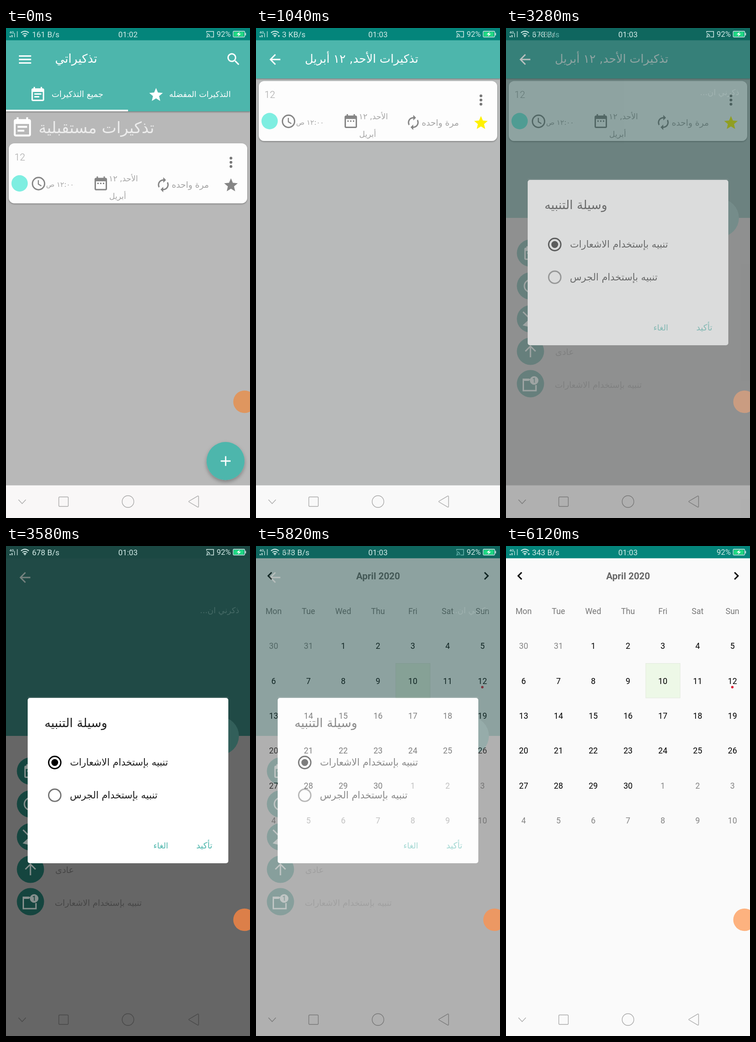
These frames come from a looping animation (529 by 1058 pixels, 8000 ms). An HTML page:

```html
<!DOCTYPE html>
<html lang="ar">
<head>
<meta charset="utf-8">
<title>تذكيراتي</title>
<style>
html, body { margin: 0; width: 100%; height: 100%; overflow: hidden; background: #b8b8b8; }
svg { display: block; width: 100vw; height: 100vh; }
text { font-family: Roboto, "Noto Sans", sans-serif; text-anchor: middle; }
.ar { font-family: "DejaVu Sans", sans-serif; direction: rtl; }
</style>
</head>
<body>
<svg id="stage" viewBox="0 0 529 1058" xmlns="http://www.w3.org/2000/svg"></svg>
<script>
const LOOP = 8000, STEP = 60, STEPS = 10;
const TEAL = '#4db6ac', GREY = '#858585';

// 24-unit icon outlines
const ICONS = {
  search: 'M15.5 14h-.79l-.28-.27C15.41 12.59 16 11.11 16 9.5 16 5.91 13.09 3 9.5 3S3 5.91 3 9.5 5.91 16 9.5 16c1.61 0 3.09-.59 4.23-1.57l.27.28v.79l5 4.99L20.49 19l-4.99-5zm-6 0C7.01 14 5 11.99 5 9.5S7.01 5 9.5 5 14 7.01 14 9.5 11.99 14 9.5 14z',
  note: 'M17 10H7v2h10v-2zm2-7h-1V1h-2v2H8V1H6v2H5c-1.11 0-2 .9-2 2v14c0 1.1.89 2 2 2h14c1.1 0 2-.9 2-2V5c0-1.1-.9-2-2-2zm0 16H5V8h14v11zm-5-5H7v2h7v-2z',
  date: 'M9 11H7v2h2v-2zm4 0h-2v2h2v-2zm4 0h-2v2h2v-2zm2-7h-1V2h-2v2H8V2H6v2H5c-1.11 0-2 .9-2 2v14c0 1.1.89 2 2 2h14c1.1 0 2-.9 2-2V6c0-1.1-.9-2-2-2zm0 16H5V9h14v11z',
  star: 'M12 17.27L18.18 21l-1.64-7.03L22 9.24l-7.19-.61L12 2 9.19 8.63 2 9.24l5.46 4.73L5.82 21z',
  loop: 'M12 6v3l4-4-4-4v3c-4.42 0-8 3.58-8 8 0 1.57.46 3.03 1.24 4.26L6.7 14.8c-.45-.83-.7-1.79-.7-2.8 0-3.31 2.69-6 6-6zm6.76 1.74L17.3 9.2c.44.84.7 1.79.7 2.8 0 3.31-2.69 6-6 6v-3l-4 4 4 4v-3c4.42 0 8-3.58 8-8 0-1.57-.46-3.03-1.24-4.26z',
  back: 'M20 11H7.83l5.59-5.59L12 4l-8 8 8 8 1.41-1.41L7.83 13H20v-2z'
};

const rect = (x, y, w, h, fill, more = '') =>
  `<rect x="${x}" y="${y}" width="${w}" height="${h}" fill="${fill}" ${more}/>`;
const disc = (x, y, r, fill, more = '') =>
  `<circle cx="${x}" cy="${y}" r="${r}" fill="${fill}" ${more}/>`;
const ring = (x, y, r, color, w) => disc(x, y, r, 'none', `stroke="${color}" stroke-width="${w}"`);
const line = (d, color, w, more = '') =>
  `<path d="${d}" fill="none" stroke="${color}" stroke-width="${w}" ${more}/>`;
const label = (s, x, y, size, fill, more = '') =>
  `<text x="${x}" y="${y}" font-size="${size}" fill="${fill}" ${more}>${s}</text>`;
const arabic = (s, x, y, size, fill) => label(s, x, y, size, fill, 'class="ar"');
const icon = (name, x, y, fill, scale = 1.47) =>
  `<path d="${ICONS[name]}" fill="${fill}" transform="translate(${x} ${y}) scale(${scale}) translate(-12 -12)"/>`;
const clock = (x, y, color) =>
  ring(x, y, 13.2, color, 2.9) + line(`M${x - .4} ${y - 7.5}v8.5l6.5 4`, color, 2.3);

function statusBar({ speed, time, bg = '#04857b', cast = true, arrow = false }) {
  const ink = '#d3ebe8';
  let s = rect(0, 0, 529, 26.5, bg);
  s += label('4G', 12.5, 11.5, 8, ink, 'font-weight="500"');
  s += line('M9 17v3M13 15v5', ink, 2) + line('M18.5 11v9M24.5 7v13', ink, 1.6, 'opacity=".8"');
  s += line('M32.500 10.500Q41 3.500 49.500 10.500M35.500 14Q41 9.500 46.500 14', ink, 2);
  s += line('M38 17Q41 15 44 17', ink, 2) + disc(41, 18.6, 1.3, ink);
  if (arrow) s += `<path d="M47 16h5l-2.500 4z" fill="${ink}"/>`;
  s += label(speed, 56.5, 19.5, 17, ink, 'style="text-anchor:start"');
  s += label(time, 264.5, 19.5, 16.8, ink);
  if (cast) {
    s += line('M435 10V7.500H450V19.500H444M435 12.500Q442 12.500 442 20M435 16Q438.500 16 438.500 20', ink, 1.5);
    s += disc(435.5, 19.2, 1.2, ink);
  }
  s += label('92%', 472, 19, 16.4, ink);
  s += rect(492.5, 7, 25, 12.5, '#079f72', `rx="1.5" stroke="${ink}" stroke-width="1.3"`);
  s += rect(494, 8.5, 21, 9.5, '#1fd883') + rect(518.5, 10.5, 1.8, 5.5, ink);
  return s + '<path d="M507 8l-7 6h4.500l-2 4.500 7-6h-4.500z" fill="#fff"/>';
}

function navBar(bg, ink) {
  return rect(0, 987.5, 529, 70.5, bg) +
    line('M27 1018.500L35 1027L43 1018.500', ink, 1.4) +
    rect(114.5, 1012.5, 20.5, 20.5, 'none', `rx="2" stroke="${ink}" stroke-width="1.4"`) +
    ring(264.5, 1022.5, 12.7, ink, 1.4) +
    line('M397 1021.500L416 1010.500Q417.500 1010 417.500 1012V1033Q417.500 1035 416 1034.500L397 1023.500Q395.500 1022.500 397 1021.500Z', ink, 1.4);
}

const recorder = fill => disc(517, 807, 24.3, fill);

// One reminder card with its top at y
function card(y, starColor) {
  const ink = '#a5a5a5';
  return `<g transform="translate(0 ${y})">` +
    rect(6, 0, 517, 129.5, '#fdfdfd', 'rx="12" filter="url(#soft)"') +
    label('12', 30, 36.5, 21, ink, 'font-weight="300"') +
    [32, 41, 50].map(v => disc(487.7, v, 3, '#777')).join('') +
    disc(29.5, 86.5, 17.7, '#7eeee1') +
    clock(70.5, 87, GREY) + arabic('١٢:٠٠ ص', 117, 94, 15, ink) +
    icon('date', 205.5, 86.5, GREY, 1.5) +
    arabic('الأحد, ١٢', 254.5, 82, 17, ink) + arabic('أبريل', 242, 120, 17, ink) +
    icon('loop', 341, 89.5, GREY) + arabic('مرة واحده', 399.5, 96, 18.5, ink) +
    icon('star', 487.7, 90.2, starColor) + '</g>';
}

function home() {
  return rect(0, 0, 529, 1058, '#b8b8b8') +
    rect(0, 26, 529, 154, TEAL, 'filter="url(#soft)"') +
    statusBar({ speed: '161 B/s', time: '01:02' }) +
    line('M28 60.500H54.500M28 68H54.500M28 75.500H54.500', '#fff', 2.8) +
    arabic('تذكيراتي', 152, 75, 26, '#fff') + icon('search', 493.3, 67.6, '#fff') +
    icon('note', 69, 144, '#fff', 1.53) + arabic('جميع التذكيرات', 155, 149, 17.8, '#fff') +
    icon('star', 325.3, 144.2, '#fff') + arabic('التذكيرات المفضله', 420.5, 149, 17.4, '#fff') +
    rect(0, 176.5, 264.5, 3.5, '#fff') +
    icon('note', 35.5, 215.5, '#fff', 2.07) + arabic('تذكيرات مستقبلية', 196, 227, 34, '#ececec') +
    card(249, GREY) + recorder('#df965f') +
    disc(476, 935, 41.2, TEAL, 'filter="url(#deep)"') +
    line('M465.500 935H487M476.200 924.500V945.500', '#fff', 2.8) +
    navBar('#f9f7f7', '#aaa');
}

function dayList() {
  return rect(0, 0, 529, 1058, '#b8baba') +
    rect(0, 26, 529, 83, TEAL, 'filter="url(#soft)"') +
    statusBar({ speed: '3 KB/s', time: '01:03', arrow: true }) +
    icon('back', 41, 68, '#fff') + arabic('تذكيرات الأحد, ١٢ أبريل', 229, 75, 25, '#fff') +
    card(114.5, '#fff100') + navBar('#f9f9f9', '#aaa');
}

function dialog() {
  const dark = '#204a46', pale = '#858f8d', dim = '#464646';
  const sides = [486, 557, 628, 698, 768].map(y => disc(53, y, 29.5, '#15453f')).join('');
  return rect(0, 0, 529, 1058, '#666') + rect(0, 26, 529, 384, dark) +
    statusBar({ speed: '678 B/s', time: '01:03', bg: '#1b4843' }) +
    icon('back', 41, 68, '#75827f') + arabic('ذكرني ان...', 463, 145, 17.5, '#456a66') +
    disc(464, 410, 41, '#325f5a') + sides +
    icon('date', 53, 486, pale) + clock(53, 557, pale) +
    line('M37 613L48 624', pale, 3) + `<path d="M36 642L48 631V645Z" fill="${pale}"/>` +
    line('M53 711V687M42 698L53 687L64 698', pale, 3) +
    line('M52 759H37.500V783H65V771', pale, 3) + rect(36, 757, 14, 5, pale) +
    disc(61, 761, 9.3, pale) + label('1', 61, 766, 14, dark, 'font-weight="700"') +
    arabic('عادى', 127, 706, 19, dim) +
    arabic('تنبيه بإستخدام الاشعارات', 200, 777, 18.3, dim) +
    recorder('#dc7f49') + navBar('#666', '#484848') +
    rect(47, 326.3, 435, 1, '#53706d') + rect(47, 328, 435, 357, '#fff', 'rx="5"') +
    arabic('وسيلة التنبيه', 151.5, 391, 26.5, '#1c1c1c') +
    ring(105.7, 467.5, 13.2, '#000', 2.9) + disc(105.7, 467.5, 7.4, '#000') +
    arabic('تنبيه بإستخدام الاشعارات', 245, 474, 20.6, '#1c1c1c') +
    ring(105.7, 538.2, 13.2, '#757575', 2.9) +
    arabic('تنبيه بإستخدام الجرس', 233.5, 545, 20.8, '#1c1c1c') +
    arabic('الغاء', 335.5, 653, 17.5, TEAL) + arabic('تأكيد', 430, 653, 18.5, TEAL);
}

function calendar() {
  const col = i => 38.2 + 75.45 * i;
  let s = rect(0, 0, 529, 1058, '#fafafa') +
    statusBar({ speed: '343 B/s', time: '01:03', cast: false, arrow: true }) +
    line('M34 57L26.500 64.500L34 72M495.500 57L503 64.500L495.500 72', '#000', 3) +
    label('April 2020', 264.8, 72, 20.4, '#666', 'font-weight="700"') +
    rect(303, 253.5, 74.5, 74.5, '#edf8e7', 'stroke="#e2e9de" stroke-width="1"');
  ['Mon', 'Tue', 'Wed', 'Thu', 'Fri', 'Sat', 'Sun'].forEach((d, i) => {
    s += label(d, col(i), 147, 17.6, '#777');
  });
  for (let i = 0; i < 42; i++) {
    const n = i - 1, inMonth = n >= 1 && n <= 30;
    const day = n < 1 ? n + 31 : n > 30 ? n - 30 : n;
    s += label(day, col(i % 7), 222.2 + 75.4 * Math.floor(i / 7), 17.6, inMonth ? '#000' : '#858585');
  }
  return s + disc(490.7, 304.7, 2.7, '#dc1f35') + recorder('#fdb27f') + navBar('#fafafa', '#aaa');
}

const scenes = [
  { draw: home },
  { draw: dayList, at: 500 },
  { draw: dialog, at: 3040 },
  { draw: calendar, at: 5580 }
];

const shadow = (id, dy, blur, alpha) =>
  `<filter id="${id}" x="-20%" y="-20%" width="140%" height="150%">
    <feDropShadow dx="0" dy="${dy}" stdDeviation="${blur}" flood-color="#000" flood-opacity="${alpha}"/></filter>`;

const stage = document.getElementById('stage');
stage.innerHTML = `<defs>${shadow('soft', 1.5, 1.5, .35)}${shadow('deep', 4, 4, .3)}</defs>` +
  scenes.map(s => `<g${s.at ? ' opacity="0"' : ''}>${s.draw()}</g>`).join('');

// Each scene dissolves over the one below in ten equal steps
const layers = stage.querySelectorAll(':scope > g');
scenes.forEach(({ at }, i) => {
  if (!at) return;
  layers[i].animate([
    { opacity: 0, offset: 0 },
    { opacity: 0, offset: at / LOOP, easing: `steps(${STEPS}, start)` },
    { opacity: 1, offset: (at + STEP * STEPS) / LOOP },
    { opacity: 1, offset: 1 }
  ], { duration: LOOP, iterations: Infinity });
});
</script>
</body>
</html>
```
